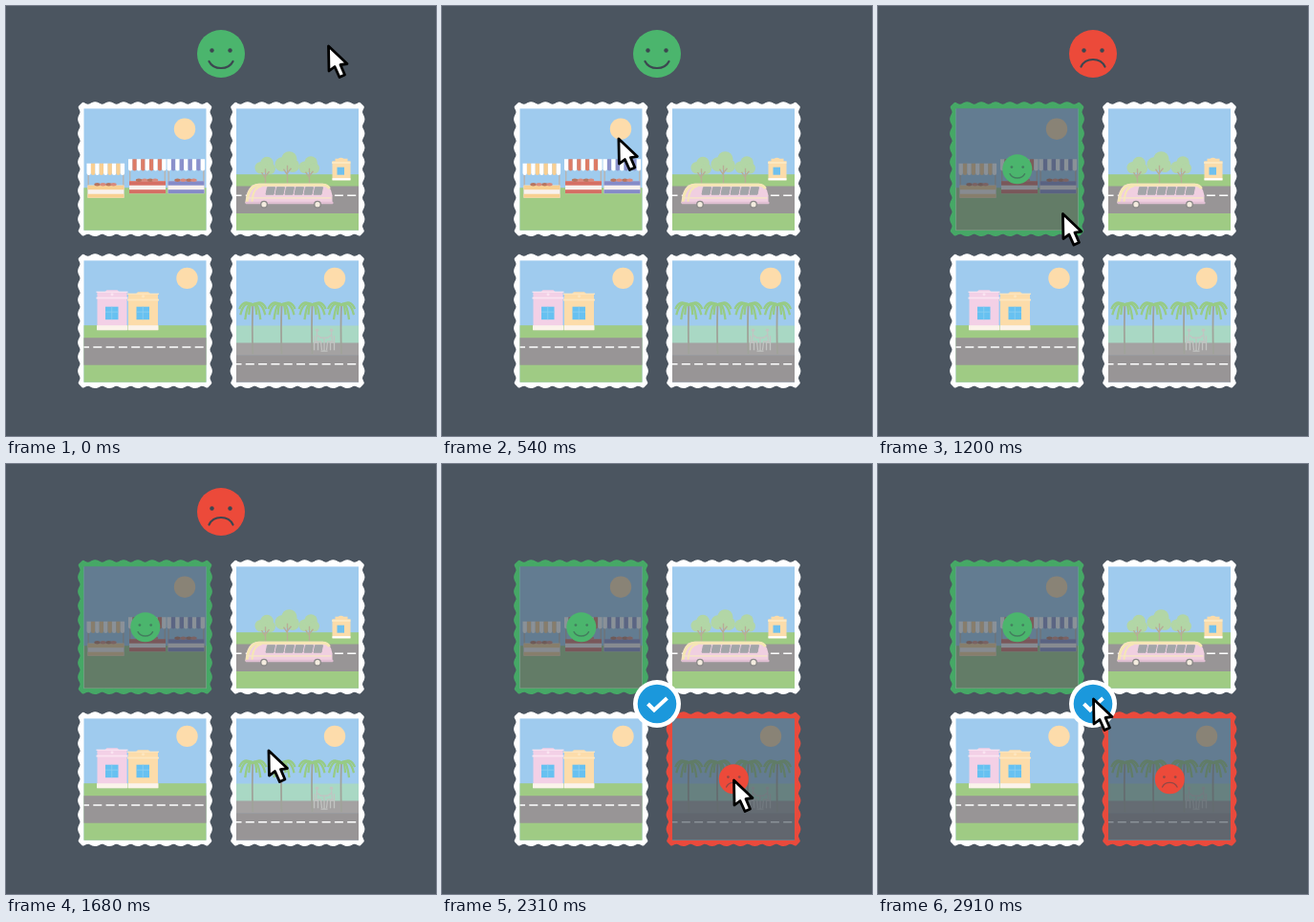
Recreate the animation shown at these times as an HTML page. Size 450x450 px, loop 3740 ms.

```html
<!DOCTYPE html>
<html lang="en">
<head>
<meta charset="utf-8">
<title>Picture choice</title>
<style>
html, body { margin: 0; width: 100%; height: 100%; overflow: hidden; background: #4b5560; }
svg { display: block; width: 100vw; height: 100vh; }
</style>
</head>
<body>
<svg id="stage" viewBox="0 0 450 450"></svg>
<script>
const SKY = '#9fcbee', GRASS = '#9fcb84', ROAD = '#989596', SUN = '#fddcab';
const GREEN = '#46a866', RED = '#ea4a3c';

const rect = (x, y, w, h, fill, more = '') =>
  `<rect x="${x}" y="${y}" width="${w}" height="${h}" fill="${fill}" ${more}/>`;
const dot = (x, y, r, fill) => `<circle cx="${x}" cy="${y}" r="${r}" fill="${fill}"/>`;
const line = (d, stroke, width, more = '') =>
  `<path d="${d}" fill="none" stroke="${stroke}" stroke-width="${width}" ${more}/>`;
const each = (list, draw) => list.map(draw).join('');

// Wavy stamp outline around the origin
function stampPath() {
  const half = 67.2, waves = 9, steps = 108, points = [];
  for (let side = 0; side < 4; side++) {
    const a = side * Math.PI / 2, c = Math.cos(a), s = Math.sin(a);
    for (let i = 2; i < steps - 1; i++) {
      const u = -half + 2 * half * i / steps;
      const v = -half - 1.2 * Math.cos(2 * Math.PI * waves * i / steps);
      points.push((u * c - v * s).toFixed(1) + ' ' + (u * s + v * c).toFixed(1));
    }
  }
  return 'M' + points.join('L') + 'Z';
}

// Scenes use a local box of 130 by 128
function stall(x, y, color, trim) {
  let s = rect(x + 1, y + 10, 1.4, 26, '#b9b4b0') + rect(x + 37.6, y + 10, 1.4, 26, '#b9b4b0');
  for (let i = 0; i < 9; i++)
    s += `<path d="M${x + i * 4.4} ${y}h4.4v10a2.2 2.2 0 0 1-4.4 0z" fill="${i % 2 ? color : '#fff'}"/>`;
  s += rect(x + 1, y + 23, 38, 13, '#f8f1ee') + rect(x + 1, y + 23, 38, 4.5, trim) +
    rect(x + 1, y + 32, 38, 4, trim);
  return s + each([11, 17, 23, 28], (dx, i) =>
    `<ellipse cx="${x + dx}" cy="${y + 22}" rx="3.2" ry="1.7" fill="${i % 2 ? '#d98a7c' : '#b9755f'}"/>`);
}

const market = rect(0, 0, 130, 128, SKY) + rect(0, 83, 130, 45, GRASS) + dot(106, 21.5, 11.2, SUN) +
  stall(3.5, 57.5, '#f9cf91', '#f8d092') + stall(47, 53, '#dd7c66', '#d56f64') + stall(87.5, 53, '#8b91cb', '#858bc8');

const dashes = y => line(`M-3 ${y}H130`, '#fff', 1.4, 'stroke-dasharray="9 4.3"');

const tree = (x, y, r) =>
  dot(x - r * .45, y + 1, r * .6, '#b2d6a6') + dot(x + r * .15, y - r * .35, r * .65, '#b2d6a6') +
  dot(x + r * .45, y + r * .2, r * .55, '#b2d6a6') +
  line(`M${x} 78V${y + 2}M${x} ${y + 12}l-4-6M${x} ${y + 10}l4-5`, '#b8ad96', 1.4);

const bus = `<path d="M10 99Q11 79 24 78.5H91Q99 79 101 91V99Z" fill="#f0cfe0"/>` +
  line('M11.5 99Q13 80 25 80H91Q96 80 98 84', '#f6e7b4', 3) + line('M17 98Q18 82 27 81.5', '#f6e7b4', 2) +
  each([0, 1, 2, 3, 4, 5], i => `<path d="M${33 + i * 10} 82.5h8l-1.5 7.5h-8z" fill="#a3a5a9" stroke="#a3a5a9" stroke-linejoin="round"/>`) +
  rect(11, 93, 89, 1.4, '#f6e7c6') + rect(10, 97.5, 92, 2.5, '#e0bfd2', 'rx="1"') +
  each([29.5, 85.5], x => dot(x, 100.5, 4, '#8c8a8a') + dot(x, 100.5, 2.6, '#f4ecdf'));

const busStop = rect(0, 0, 130, 128, SKY) + rect(0, 69, 130, 59, GRASS) + rect(0, 81.3, 130, 28.5, ROAD) + dashes(91) +
  tree(31, 61, 10.5) + tree(54, 57.5, 12.5) + tree(77, 60.5, 10.5) +
  `<path d="M101 75V55h3v-2.5h3q3-2 6 0h4V55h3v20z" fill="#fbdcaa"/>` +
  rect(100.5, 56, 19.5, 1.6, '#fdebc8') + rect(106, 61.5, 7.5, 8, '#6fc0ee') +
  rect(101, 73, 19, 2.2, '#fff') + bus;

const house = (x, y, wall, trim) =>
  rect(x, y + 4, 31, 69 - y, wall) + `<path d="M${x} ${y + 5}v-3h8l2-2h11l2 2h8v3z" fill="${wall}"/>` +
  rect(x - 1, y + 7.5, 33, 1.8, trim) + rect(x - 1, y + 1.5, 33, 1.2, trim) + dot(x + 15.5, y + 4.5, 1.5, trim) +
  rect(x + 8.5, 48.5, 13.5, 13.5, '#67c1f1') + line(`M${x + 15.25} 48.5v13.5M${x + 8.5} 54h13.5`, '#8fd0f2', .8) +
  rect(x - .5, 68, 32, 5, '#fbf3ea');

const street = rect(0, 0, 130, 128, SKY) + rect(0, 68, 130, 60, GRASS) + rect(0, 81, 130, 28.5, ROAD) + dashes(90.8) +
  dot(108.5, 18.7, 11.2, SUN) + house(14.5, 31, '#f3d0e6', '#fae4f1') + house(47, 33, '#fcdcaa', '#fde6bf');

const palm = x => line(`M${x} 98Q${x - 1} 70 ${x} 46`, '#a0a39a', 1.8) + each(
  [[14, 6], [13, 12], [8, 17], [4, 12]],
  ([dx, dy]) => each([-dx, dx], d =>
    line(`M${x} 47Q${x + d * .7} ${39 + dy * .15} ${x + d} ${45 + dy}`, '#97cb85', 2.3)));

const sitter = (x, dir) => dot(x, 73, 1.8, '#c2c4c2') +
  line(`M${x} 75l${-dir} 10h${5 * dir}l${dir} 9M${x} 78l${4 * dir} 3M${x - 3 * dir} 79v15M${x - 3 * dir} 86h${4 * dir}v8`, '#c2c4c2', 1.3);

const beach = rect(0, 0, 130, 128, SKY) + rect(0, 68.3, 130, 20, '#a9d8c4') + rect(0, 86.3, 130, 13, '#a4a2a2') +
  rect(0, 99, 130, 29, ROAD) + dashes(108.6) +
  dot(103.5, 18.7, 11.2, SUN) + each([17.8, 48, 80, 110.5], palm) +
  sitter(85, 1) + sitter(100, -1) + line('M88 81h9M92.5 81v14M89 95h7', '#c2c4c2', 1.3);

const face = (x, y, scale, happy, ink) => `<g transform="translate(${x} ${y}) scale(${scale})">` +
  dot(0, 0, 25, happy ? '#4bb56d' : '#ec4a3a') +
  `<g opacity="${ink}">${dot(-9.5, -3.5, 2.2, '#3c4750')}${dot(9.5, -3.5, 2.2, '#3c4750')}` +
  line(happy ? 'M-12.5 8Q-9 15 0 15T12.5 8' : 'M-12.5 13.5Q-9 6 0 6T12.5 13.5', '#3c4750', 2.2, 'stroke-linecap="round"') +
  '</g></g>';

const edge = stampPath();
const card = (x, y, scene, id, happy) => `<g transform="translate(${x} ${y})">
<path id="${id}Edge" d="${edge}" fill="#fff" stroke="#fff" stroke-width="4" stroke-linejoin="round"/>
<svg x="-64" y="-63.5" width="128" height="127.5" viewBox=".5 0 128 127.5">${scene}</svg>
<g id="${id}Mark" visibility="hidden">${rect(-64, -63.5, 128, 127.5, '#3c4854', 'opacity=".6"')}
${face(.3, 0, .62, happy, .5)}</g></g>`;

const $ = id => document.getElementById(id);
$('stage').innerHTML =
  card(145.5, 170.7, market, 'good', true) + card(305, 170.7, busStop, 'bus', true) +
  card(145.5, 329.7, street, 'street', true) + card(305, 329.7, beach, 'bad', false) +
  `<g id="askGood">${face(225, 50, 1, true, 1)}</g><g id="askBad">${face(225, 50, 1, false, 1)}</g>
<g id="done">${dot(225, 251, 25, '#fff')}${dot(225, 251, 20.3, '#1b98dc')}
${line('M215.5 251l6.5 6.5L235.5 245', '#fff', 4)}</g>
<path id="cursor" d="M0 0L.5 26 6.5 21.5 11.5 32.5 17 30 12.5 19.5 19.5 18.5Z" fill="#fff" stroke="#000" stroke-width="2.8" stroke-linejoin="round"/>`;

// Cursor stops: time, x, y
const stops = [[0, 337.5, 42], [690, 142.5, 166], [900, 142.5, 166], [1860, 305.5, 331],
  [2370, 305.5, 331], [2910, 225.5, 246], [3740, 225.5, 246]];
const PICK_GOOD = 900, PICK_BAD = 2070;

const show = (id, on) => $(id).setAttribute('visibility', on ? 'visible' : 'hidden');

function draw(now) {
  const t = Math.floor(now % 3740 / 30) * 30;
  const i = stops.findIndex(s => s[0] > t);
  const [t0, x0, y0] = stops[i - 1], [t1, x1, y1] = stops[i];
  const k = (t - t0) / (t1 - t0);
  $('cursor').setAttribute('transform', `translate(${x0 + (x1 - x0) * k} ${y0 + (y1 - y0) * k})`);

  const good = t >= PICK_GOOD, bad = t >= PICK_BAD;
  for (const [id, on, color] of [['good', good, GREEN], ['bad', bad, RED]]) {
    show(id + 'Mark', on);
    $(id + 'Edge').setAttribute('fill', on ? color : '#fff');
    $(id + 'Edge').setAttribute('stroke', on ? color : '#fff');
  }
  show('askGood', !good);
  show('askBad', good && !bad);
  show('done', bad);
}

const start = performance.now();
function tick() {
  draw(performance.now() - start);
  requestAnimationFrame(tick);
}
tick();
</script>
</body>
</html>
```
